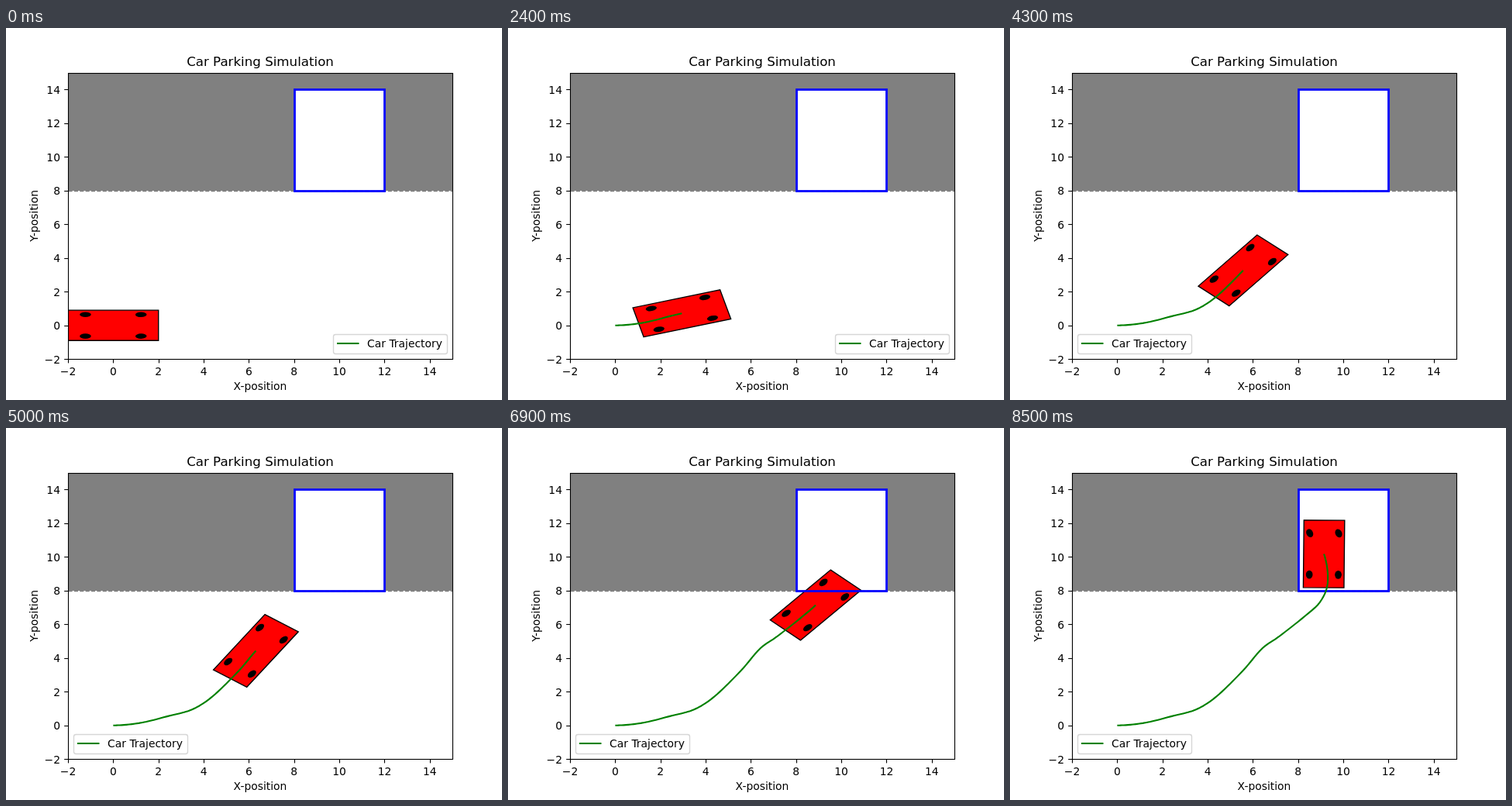
An HTML page with a canvas that plays this animation: 640 by 480 pixels, repeating every 8540 ms.

```html
<!DOCTYPE html>
<html lang="en">
<head>
<meta charset="utf-8">
<title>Car Parking Simulation</title>
<style>
  html, body { margin: 0; width: 100%; height: 100%; overflow: hidden; background: #fff; }
  canvas { display: block; }
</style>
</head>
<body>
<canvas id="stage" width="640" height="480"></canvas>
<script>
const ctx = document.getElementById('stage').getContext('2d');
const LOOP = 8540, STEP = 100, LAST_STEP = 85;
const SPEED_UP_STEPS = 17, LEGEND_MOVES_AT = 30;
const AXLE = 1.23;                      // distance from car centre to either axle
const PT = 100 / 72;
const AXES = { left: 80, top: 57.6, width: 496, height: 369.6 };
const UNIT_X = AXES.width / 17, UNIT_Y = AXES.height / 17;
const toX = x => AXES.left + (x + 2) * UNIT_X;
const toY = y => AXES.top + (15 - y) * UNIT_Y;

// Key points of the route; the outermost two only shape its ends
const KEY_POINTS = [
  [-1.2, 0.1], [0, 0], [1.17, 0.14], [2.46, 0.56], [3.5, 0.95], [4.4, 1.73], [5.56, 3.25],
  [6.4, 4.55], [7.15, 5.27], [8.36, 6.55], [9, 7.38], [9.31, 8.5], [9.143, 10.175], [8.4, 12.2]
];

const catmullRom = (a, b, c, d, u) =>
  b + u / 2 * (c - a + u * (2 * a - 5 * b + 4 * c - d + u * (3 * (b - c) + d - a)));

// Dense samples of the route with direction and distance travelled
function sampleRoute(perSegment = 200) {
  const route = [];
  let distance = 0, x = 0, y = 0;
  for (let i = 0; i < KEY_POINTS.length - 3; i++) {
    const four = KEY_POINTS.slice(i, i + 4);
    for (let j = 1; j <= perSegment; j++) {
      const [nextX, nextY] = [0, 1].map(c =>
        catmullRom(...four.map(p => p[c]), j / perSegment));
      const direction = Math.atan2(nextY - y, nextX - x);
      route.push({ x, y, direction, distance });
      distance += Math.hypot(nextX - x, nextY - y);
      [x, y] = [nextX, nextY];
    }
  }
  route.push({ ...route.at(-1), x, y, distance });
  return route;
}

// The car speeds up evenly, then cruises; its body turns after the front wheels
function drive() {
  const route = sampleRoute();
  const progress = k => k < SPEED_UP_STEPS ? k * k / (2 * SPEED_UP_STEPS) : k - SPEED_UP_STEPS / 2;
  const cruise = route.at(-1).distance / progress(LAST_STEP);
  const poses = [];
  let heading = 0, previous = route[0];
  for (let k = 0; k <= LAST_STEP; k++) {
    const spot = route.find(p => p.distance >= progress(k) * cruise) || route.at(-1);
    const moved = spot.distance - previous.distance;
    heading += moved / AXLE * Math.sin(previous.direction - heading);
    poses.push({ x: spot.x, y: spot.y, heading, steering: spot.direction - heading });
    previous = spot;
  }
  return poses;
}

const poses = drive();

function line(x1, y1, x2, y2, color, width) {
  ctx.beginPath();
  ctx.moveTo(x1, y1);
  ctx.lineTo(x2, y2);
  ctx.strokeStyle = color;
  ctx.lineWidth = width;
  ctx.stroke();
}

function text(label, x, y, align = 'center', size = 10) {
  ctx.font = `${size * PT}px "DejaVu Sans", sans-serif`;
  ctx.textAlign = align;
  ctx.fillStyle = '#000';
  ctx.fillText(label, x, y);
}

// Builds a path in car coordinates, leaving pen widths in pixels
function carPath({ x, y, heading }, build) {
  ctx.save();
  ctx.translate(toX(x), toY(y));
  ctx.scale(UNIT_X, -UNIT_Y);
  ctx.rotate(heading);
  ctx.beginPath();
  build();
  ctx.restore();
}

function drawCar(car) {
  carPath(car, () => ctx.rect(-2, -0.9, 4, 1.8));
  ctx.fillStyle = '#f00';
  ctx.fill();
  ctx.strokeStyle = '#000';
  ctx.lineWidth = PT;
  ctx.stroke();
  ctx.fillStyle = '#000';
  for (const x of [-AXLE, AXLE]) {
    for (const y of [-0.64, 0.64]) {
      const turn = x > 0 ? car.steering : 0;
      carPath(car, () => ctx.ellipse(x, y, 0.25, 0.15, turn, 0, 2 * Math.PI));
      ctx.fill();
    }
  }
}

function drawTrajectory(step) {
  ctx.beginPath();
  for (const { x, y } of poses.slice(0, step + 1)) ctx.lineTo(toX(x), toY(y));
  ctx.strokeStyle = '#008000';
  ctx.lineWidth = 1.5 * PT;
  ctx.lineJoin = 'round';
  ctx.stroke();
  ctx.lineJoin = 'miter';
}

function drawLegend(x) {
  ctx.beginPath();
  ctx.roundRect(x, 395.5, 147, 25, 2.8);
  ctx.fillStyle = 'rgba(255,255,255,.8)';
  ctx.fill();
  ctx.strokeStyle = 'rgba(204,204,204,.8)';
  ctx.lineWidth = PT;
  ctx.stroke();
  line(x + 4.5, 407, x + 33, 407, '#008000', 1.5 * PT);
  text('Car Trajectory', x + 43.6, 412, 'left');
}

function drawAxes() {
  ctx.strokeStyle = '#000';
  ctx.lineWidth = 0.8 * PT;
  ctx.strokeRect(80.5, 58.5, 496, 369);
  for (let v = -2; v <= 14; v += 2) {
    const label = String(v).replace('-', '\u2212');
    const x = Math.round(toX(v)) + 0.5, y = Math.round(toY(v)) + 0.5;
    line(x, 427.5, x, 432.4, '#000', 0.8 * PT);
    line(75.2, y, 80, y, '#000', 0.8 * PT);
    text(label, toX(v), 448);
    text(label, 70, Math.round(toY(v) + 5.3), 'right');
  }
  text('X-position', 328, 467);
  text('Car Parking Simulation', 328, 49, 'center', 12);
  ctx.save();
  ctx.translate(41, 242.4);
  ctx.rotate(-Math.PI / 2);
  text('Y-position', 0, 0);
  ctx.restore();
}

function draw(step) {
  ctx.fillStyle = '#fff';
  ctx.fillRect(0, 0, 640, 480);

  ctx.save();
  ctx.beginPath();
  ctx.rect(80, 58, 496, 369);
  ctx.clip();
  ctx.fillStyle = '#808080';
  ctx.fillRect(80, 58, 496, 152);
  ctx.fillStyle = '#fff';
  ctx.fillRect(372, 79, 117, 131);
  drawCar(poses[step]);
  ctx.setLineDash([3.7 * PT, 1.6 * PT]);
  line(80.5, 210.5, 576.5, 210.5, '#808080', PT);
  ctx.setLineDash([]);
  ctx.strokeStyle = '#00f';
  ctx.lineWidth = 2 * PT;
  ctx.strokeRect(372.5, 79.5, 116, 131);
  drawTrajectory(step);
  ctx.restore();

  drawAxes();
  drawLegend(step < LEGEND_MOVES_AT ? 422.5 : 87.5);
}

function tick() {
  draw(Math.floor(performance.now() % LOOP / STEP));
  requestAnimationFrame(tick);
}
tick();
</script>
</body>
</html>
```
